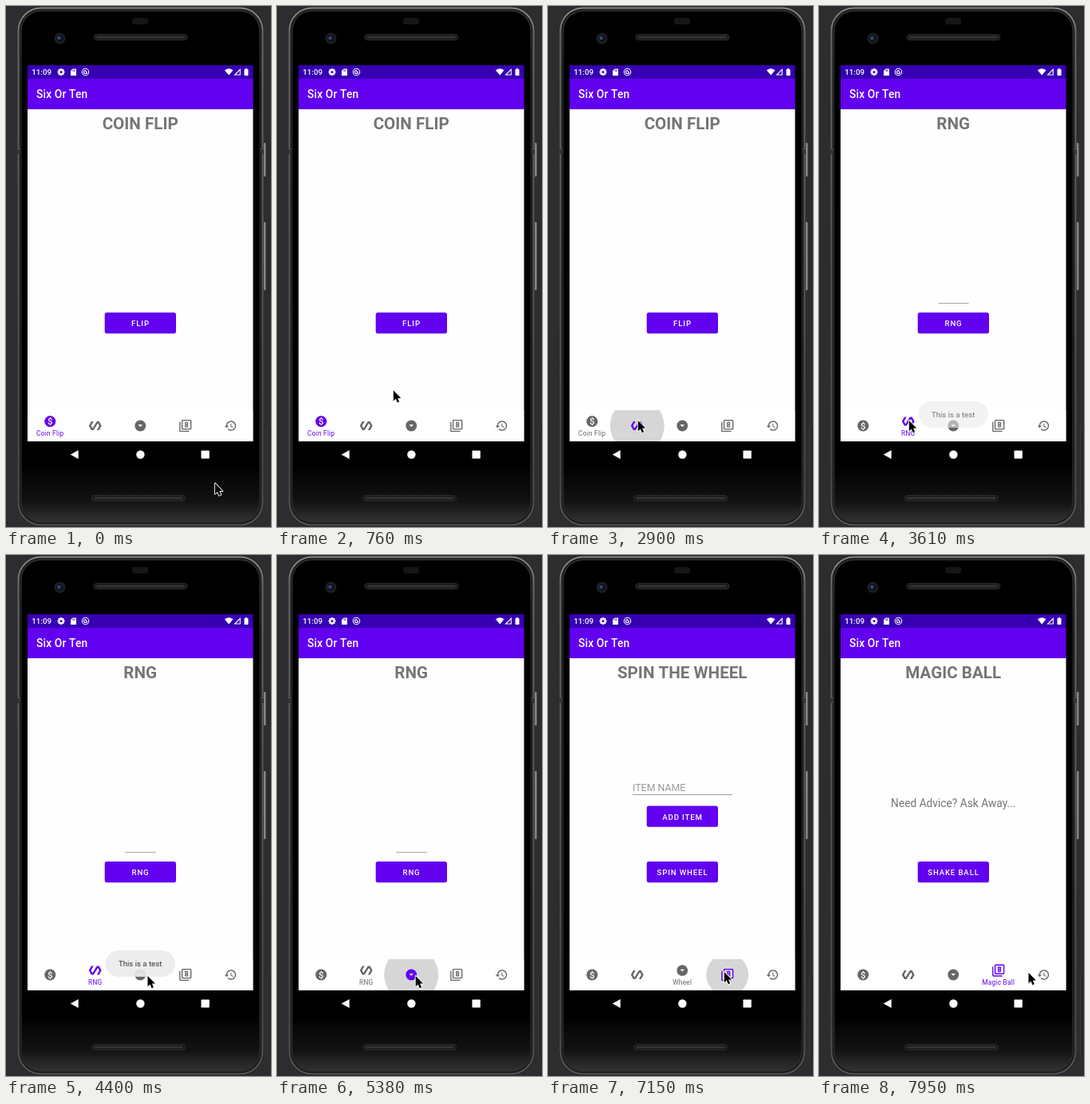
Recreate the animation shown at these times as an HTML page with a canvas. Size 332 by 651 pixels, loop 8000 ms.

```html
<!DOCTYPE html>
<html lang="en">
<head>
<meta charset="utf-8">
<title>Tabbed app demo</title>
<style>
html, body { margin: 0; width: 100%; height: 100%; overflow: hidden; background: #2c2d2f; }
canvas { display: block; width: 332px; height: 651px; }
</style>
</head>
<body>
<canvas id="stage"></canvas>
<script>
const LOOP = 8000;
const VIOLET = '#6200f0', GREY = '#666', TEXT = '#757575';
const SCREEN = { x: 27, w: 282.5 };
const canvas = document.getElementById('stage');
const ctx = canvas.getContext('2d');
const dpr = window.devicePixelRatio || 1;
canvas.width = 332 * dpr;
canvas.height = 651 * dpr;

const ICONS = {
  brackets: new Path2D('M19 4h-4L7.11 16.63 4.5 12 9 4H5L.5 12 5 20h4l7.89-12.63L19.5 12 15 20h4l4.5-8z'),
  eight: new Path2D('M3 5H1v16c0 1.1.9 2 2 2h16v-2H3V5zm18-4H7c-1.1 0-2 .9-2 2v14c0 1.1.9 2 2 2h14c1.1 0 2-.9 2-2V3c0-1.1-.9-2-2-2zm0 16H7V3h14v14zm-8-2h2c1.1 0 2-.89 2-2v-1.5c0-.83-.67-1.5-1.5-1.5.83 0 1.5-.67 1.5-1.5V7c0-1.11-.9-2-2-2h-2c-1.1 0-2 .89-2 2v1.5c0 .83.67 1.5 1.5 1.5-.83 0-1.5.67-1.5 1.5V13c0 1.11.9 2 2 2zm0-8h2v2h-2V7zm0 4h2v2h-2v-2z'),
  history: new Path2D('M13 3c-4.97 0-9 4.03-9 9H1l3.89 3.89.07.14L9 12H6c0-3.87 3.13-7 7-7s7 3.13 7 7-3.13 7-7 7c-1.93 0-3.68-.79-4.94-2.06l-1.42 1.42C8.27 19.99 10.51 21 13 21c4.97 0 9-4.03 9-9s-4.03-9-9-9zm-1 5v5l4.28 2.54.72-1.21-3.5-2.08V8H12z'),
  dropdown: new Path2D('M12 2a10 10 0 1 0 0 20a10 10 0 1 0 0-20zM12 14l-4-4h8z'),
  pointer: new Path2D('M0 0V13.2L3 10.4 5 15.2 7.3 14.2 5.4 9.6H9.4Z')
};

const TABS = [
  { label: 'Coin Flip', icon: 'coin' },
  { label: 'RNG', icon: 'brackets' },
  { label: 'Wheel', icon: 'dropdown' },
  { label: 'Magic Ball', icon: 'eight' },
  { label: '', icon: 'history' }
];

// Each tap: ripple start, moment the tab opens, tab index.
const TAPS = [
  { press: 2810, open: 3350, tab: 1 },
  { press: 5290, open: 5470, tab: 2 },
  { press: 7140, open: 7330, tab: 3 }
];

// Pointer moves: start, time of last step, steps, destination.
const MOVES = [
  [260, 940, 9, 115, 449.5],
  [2020, 2450, 6, 112.8, 518],
  [3770, 4400, 8, 177.5, 526],
  [4670, 4760, 2, 173.7, 526],
  [6080, 6610, 7, 220.8, 521],
  [7770, 7950, 3, 262.5, 522]
];

const clamp = v => Math.max(0, Math.min(1, v));
const ramp = (t, from, to) => clamp((t - from) / (to - from));
const ease = p => p * p * p * (p * (p * 6 - 15) + 10);

function rect(x, y, w, h, color) {
  ctx.fillStyle = color;
  ctx.fillRect(x, y, w, h);
}

function round(x, y, w, h, r, fill, stroke, width = 1) {
  ctx.beginPath();
  ctx.roundRect(x, y, w, h, r);
  if (fill) { ctx.fillStyle = fill; ctx.fill(); }
  if (stroke) { ctx.strokeStyle = stroke; ctx.lineWidth = width; ctx.stroke(); }
}

function disc(x, y, r, color) {
  ctx.fillStyle = color;
  ctx.beginPath();
  ctx.arc(x, y, r, 0, Math.PI * 2);
  ctx.fill();
}

function poly(color, ...points) {
  ctx.fillStyle = color;
  ctx.beginPath();
  for (let i = 0; i < points.length; i += 2) ctx.lineTo(points[i], points[i + 1]);
  ctx.closePath();
  ctx.fill();
}

function write(text, x, y, size, color, { weight = 400, align = 'center', spacing = 0 } = {}) {
  ctx.font = `${weight} ${size}px Roboto, sans-serif`;
  ctx.letterSpacing = spacing + 'px';
  ctx.textAlign = align;
  ctx.fillStyle = color;
  ctx.fillText(text, x, y);
}

function shade(...stops) {
  const gradient = ctx.createLinearGradient(0, 0, 0, 651);
  for (const [at, color] of stops) gradient.addColorStop(at, color);
  return gradient;
}

function drawPhone() {
  rect(0, 0, 332, 651, '#2c2d2f');
  round(327.5, 525.5, 20, 104, 0, '#292a2c', '#37383a');

  round(321, 170.5, 5, 43, 1.5, '#858585', '#2a2a2a');
  round(321, 269.5, 5, 86, 1.5, '#858585', '#2a2a2a');

  const rim = shade([0, '#8a8a8a'], [0.06, '#666'], [0.5, '#565656'], [0.9, '#4a4a4a'], [1, '#555']);
  const body = shade([0, '#000'], [0.88, '#000'], [0.95, '#121212'], [1, '#3a3a3a']);
  round(14, 1, 309, 649, 29, '#161616');
  round(15.5, 2.5, 306, 646, 28, '#1c1c1c', rim, 2.2);
  round(19, 6, 299, 639, 25, body, shade([0, '#444'], [0.15, '#242424'], [1, '#303030']));
  for (const x of [14, 319]) {
    rect(x, 178, 4, 7, '#333');
    rect(x, 178, 4, 1, '#555');
  }

  round(158, 15, 20, 8, 3, '#161616');
  disc(67.5, 40.5, 7, '#1d1e21');
  disc(67.5, 40.5, 4.5, '#10131f');
  disc(66.5, 40, 2.2, '#34477f');
  for (const [x, y] of [[110, 35.5], [107.5, 611.5]]) {
    round(x, y, 117, 7, 3.5, '#191919', '#2d2d2d');
    round(x + 3, y + 2, 111, 3, 1.5, '#333');
  }
}

function drawGear(x, y) {
  ctx.fillStyle = '#fff';
  for (let i = 0; i < 4; i++) {
    ctx.save();
    ctx.translate(x, y);
    ctx.rotate(i * Math.PI / 4);
    ctx.fillRect(-1.1, -4.5, 2.2, 9);
    ctx.restore();
  }
  disc(x, y, 3.4, '#fff');
  disc(x, y, 1.5, '#3700b3');
}

function drawBars() {
  rect(SCREEN.x, 74, SCREEN.w, 17, '#3700b3');
  rect(SCREEN.x, 91, SCREEN.w, 38, VIOLET);
  write('11:09', 32.3, 86, 9.7, '#fff', { align: 'left', weight: 500 });
  drawGear(69, 82.5);
  poly('#fff', 81, 81, 83.5, 78.5, 88, 78.5, 88, 87, 81, 87);
  rect(83.5, 79.7, 0.9, 2, '#3700b3');
  rect(85.1, 79.7, 0.9, 2, '#3700b3');
  ctx.strokeStyle = '#fff';
  ctx.lineWidth = 1.1;
  ctx.beginPath();
  ctx.arc(99.5, 82.5, 4.2, 0, Math.PI * 2);
  ctx.moveTo(101.5, 82.5);
  ctx.arc(99.5, 82.5, 2, 0, Math.PI * 1.5);
  ctx.lineTo(101.5, 84.5);
  ctx.stroke();

  ctx.fillStyle = '#fff';
  ctx.beginPath();
  ctx.moveTo(279.2, 86.5);
  ctx.lineTo(273.9, 80.2);
  ctx.quadraticCurveTo(279.2, 76.4, 284.5, 80.2);
  ctx.fill();
  ctx.beginPath();
  ctx.moveTo(293.3, 79.3);
  ctx.lineTo(293.3, 86);
  ctx.lineTo(286.6, 86);
  ctx.closePath();
  ctx.stroke();
  round(298.5, 79, 5, 8, 0.7, '#fff');
  rect(299.9, 78, 2.2, 1.2, '#fff');

  write('Six Or Ten', 38, 115, 13.75, '#fff', { align: 'left', weight: 500, spacing: 0.17 });

  poly('#fff', 80.7, 560.5, 90.7, 555, 90.7, 566);
  disc(168.4, 560.5, 5.2, '#fff');
  round(244.5, 555.5, 10.3, 10, 0.8, '#fff');
}

function drawButton(label, y) {
  round(123.7, y, 89.3, 26.2, 2.8, VIOLET);
  write(label, 168.5, y + 17, 9.63, '#fff', { weight: 500, spacing: 0.86 });
}

function drawPage(page) {
  const titles = ['COIN FLIP', 'RNG', 'SPIN THE WHEEL', 'MAGIC BALL'];
  const actions = ['FLIP', 'RNG', 'SPIN WHEEL', 'SHAKE BALL'];
  rect(SCREEN.x, 129, SCREEN.w, 415, '#fefefe');
  write(titles[page], 168.2, 154, 20.6, TEXT, { weight: 700 });
  drawButton(actions[page], 383);
  if (page === 1) rect(149.5, 371, 38, 1, '#a8a8a8');
  if (page === 2) {
    write('ITEM NAME', 106, 294.7, 12.4, '#9a9a9a', { align: 'left' });
    rect(106, 299, 125, 1, '#a0a0a0');
    drawButton('ADD ITEM', 313.5);
  }
  if (page === 3) write('Need Advice? Ask Away...', 168.2, 315, 13.75, TEXT);
}

function drawIcon(name, x, y, color) {
  if (name === 'coin') {
    disc(x, y, 7, color);
    write('$', x, y + 4.1, 11.5, '#fff', { weight: 500 });
    return;
  }
  ctx.save();
  ctx.translate(x, y);
  ctx.scale(0.69, 0.69);
  ctx.translate(-12, -12);
  ctx.fillStyle = color;
  ctx.fill(ICONS[name], 'evenodd');
  ctx.restore();
}

function drawTabs(t, page, pressed) {
  const tabX = i => SCREEN.x + SCREEN.w * (i + 0.5) / 5;
  ctx.save();
  ctx.beginPath();
  ctx.rect(SCREEN.x, 505, SCREEN.w, 39);
  ctx.clip();
  rect(SCREEN.x, 505, SCREEN.w, 39, '#fff');
  for (const { press, open, tab } of TAPS) {
    const fade = 1 - ramp(t, open - 60, open + 170);
    if (t < press || fade <= 0) continue;
    ctx.globalAlpha = t < open ? 1 : fade;
    disc(tabX(tab), 524.5, 25.5 + 8.5 * ramp(t, press, press + 90), '#d6d6d6');
  }
  ctx.globalAlpha = 1;

  const opened = TAPS.find(tap => tap.tab === page);
  const shift = opened ? ramp(t, opened.open - 30, opened.open + 90) : 1;
  TABS.forEach(({ label, icon }, i) => {
    const lift = i === page ? shift : i === page - 1 ? 1 - shift : 0;
    const color = i === pressed ? VIOLET : GREY;
    drawIcon(icon, tabX(i), 524.5 - 5.4 * lift, color);
    ctx.globalAlpha = lift;
    write(label, tabX(i), 537, 8.26, color, { spacing: 0.27 });
    ctx.globalAlpha = 1;
  });
  ctx.restore();
}

function drawToast(t) {
  const alpha = ramp(t, 3440, 3700) * (1 - ramp(t, 4920, 5220));
  if (!alpha) return;
  ctx.save();
  ctx.globalAlpha = alpha;
  round(124.5, 494, 87.5, 33, 16.5, 'rgba(235,235,235,.9)');
  write('This is a test', 168.1, 514.2, 9.63, '#333');
  ctx.restore();
}

function drawPointer(t) {
  let x = 262, y = 596.5;
  for (const [start, end, steps, toX, toY] of MOVES) {
    if (t < start) break;
    const step = 1 + Math.floor((t - start) / (end - start) * (steps - 1) + 1e-6);
    const p = ease(Math.min(1, step / steps));
    x += (toX - x) * p;
    y += (toY - y) * p;
  }
  ctx.save();
  ctx.translate(x, y);
  ctx.lineJoin = 'round';
  ctx.lineWidth = 1.8;
  ctx.strokeStyle = '#fff';
  ctx.stroke(ICONS.pointer);
  ctx.fillStyle = '#000';
  ctx.fill(ICONS.pointer);
  ctx.restore();
}

function draw(t) {
  ctx.setTransform(dpr, 0, 0, dpr, 0, 0);
  const page = TAPS.filter(tap => t >= tap.open).length;
  const pressed = TAPS.filter(tap => t >= tap.press).length;
  drawPhone();
  drawBars();
  drawPage(page);
  drawTabs(t, page, pressed);
  drawToast(t);
  drawPointer(t);
}

let origin;
function frame(now) {
  origin ??= now;
  draw(Math.max(0, now - origin) % LOOP);
  requestAnimationFrame(frame);
}
draw(0);
requestAnimationFrame(frame);
</script>
</body>
</html>
```
